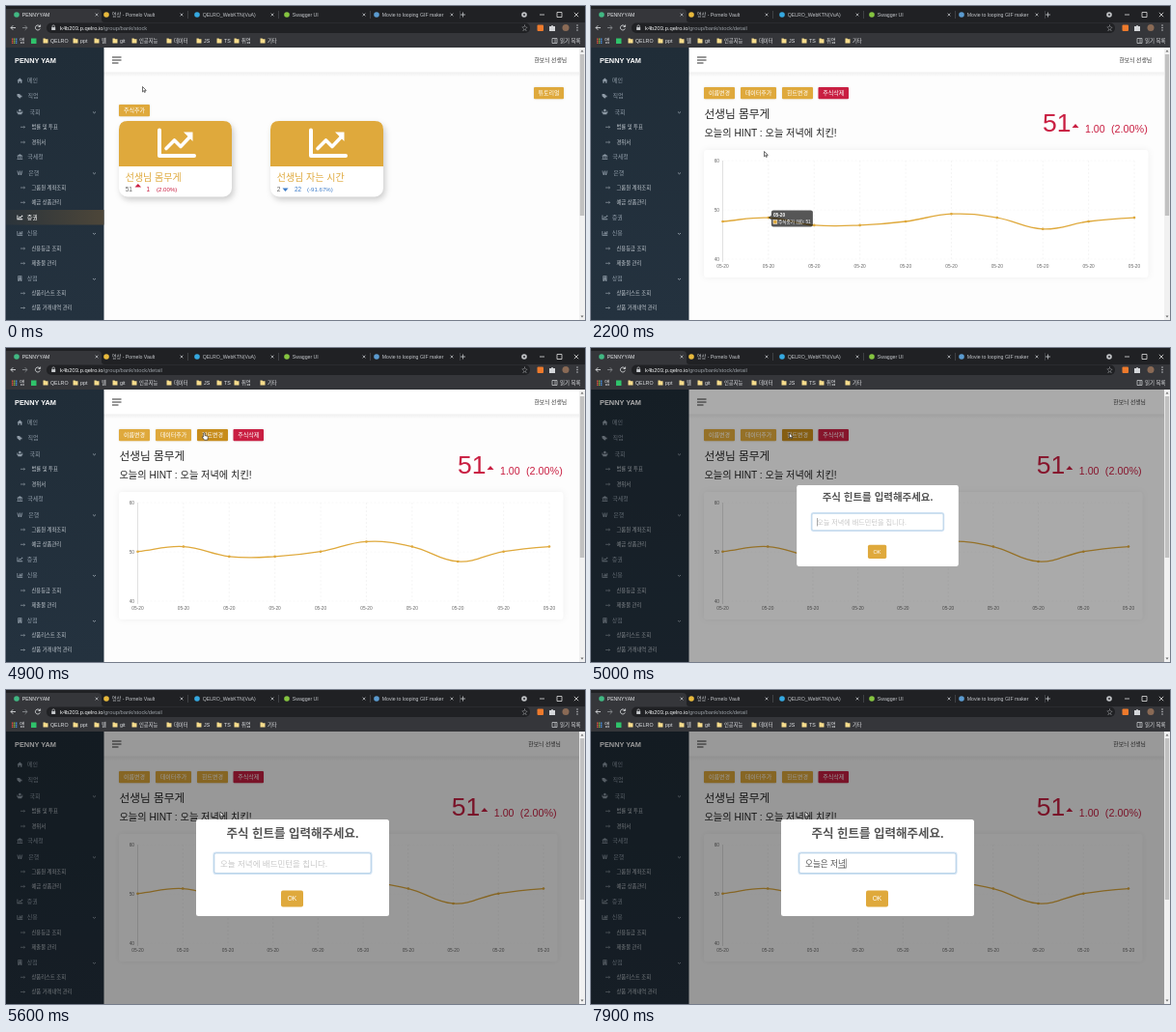
Recreate the animation shown at these times as an HTML page. Size 600 px wide and 325 px high, loop 8000 ms.

```html
<!DOCTYPE html>
<html lang="ko">
<head>
<meta charset="utf-8">
<style>
html, body { margin: 0; width: 100%; height: 100%; overflow: hidden; }
svg { display: block; font-family: "Liberation Sans", "Noto Sans CJK KR", sans-serif; }
text { white-space: pre; }
.card { filter: drop-shadow(2px 3px 3px rgba(0, 0, 0, .2)); }
.panel { filter: drop-shadow(0 0 3px rgba(0, 0, 0, .06)); }
.btn { filter: drop-shadow(0 .5px 1px rgba(0, 0, 0, .1)); }
</style>
</head>
<body>
<svg id="stage" width="600" height="325" viewBox="0 0 600 325"></svg>
<script>
const GOLD = '#dfa93c', GOLD_HOVER = '#c78c1b', RED = '#c91f42', BLUE = '#3d7cc9';
const LOOP = 8000, NAVIGATE = 1900, OPEN = 4970;

// Markup helpers; text is placed by its vertical centre.
const text = (x, cy, size, fill, str, more = '') =>
  `<text x="${x}" y="${cy + size * .36}" font-size="${size}" fill="${fill}" ${more}>${str}</text>`;
const rect = (x, y, w, h, fill, r = 0, more = '') =>
  `<rect x="${x}" y="${y}" width="${w}" height="${h}" rx="${r}" fill="${fill}" ${more}/>`;
const dot = (x, y, r, fill) => `<circle cx="${x}" cy="${y}" r="${r}" fill="${fill}"/>`;
const line = (d, stroke, w = 1, more = '', fill = 'none') =>
  `<path d="${d}" fill="${fill}" stroke="${stroke}" stroke-width="${w}" ${more}/>`;
const shape = (d, fill) => `<path d="${d}" fill="${fill}"/>`;
const MIDDLE = 'text-anchor="middle"', MEDIUM = 'font-weight="500"';
const button = (x, y, w, label, fill = GOLD, id = '') =>
  `<g class="btn">${rect(x, y, w, 12.2, fill, 1, id && `id="${id}"`)}` +
  text(x + w / 2, y + 6.1, 6, '#fff', label, MIDDLE) + '</g>';

function browser() {
  const cross = (x, y, s, c) => line(`M${x - s} ${y - s}l${2 * s} ${2 * s}m0 ${-2 * s}l${-2 * s} ${2 * s}`, c, .8);
  const tabs = [
    [8, 'PENNYYAM', '#41b883'], [101, '영상 - Pomelo Vault', '#e8b93c'], [195, 'QELRO_WebKTN(VuA)', '#35a8e0'],
    [288, 'Swagger UI', '#85c440'], [381, 'Movie to looping GIF maker', '#5b9bd0']];
  let s = rect(0, 0, 600, 43, '#35363a') + rect(0, 0, 600, 17, '#202124') +
    shape('M0 17V3H95Q99 3 99 7V14Q99 17 102 17Z', '#35363a');
  tabs.forEach(([x, name, color], i) => {
    s += dot(x + 3, 9, 2.8, color) + text(x + 8.7, 9, 5.2, i ? '#c3c6ca' : '#e8eaed', name) +
      cross([94, 182, 276, 371, 462][i], 9, 1.4, '#b5b8bc');
    if (i) s += rect([0, 185, 279, 374, 467][i] + 3, 5, .6, 8, '#55585c');
  });
  s += line('M471 9h5m-2.5 -2.5v5', '#c5c8cb', .8) + dot(537, 9, 2.8, '#c0c2c5') + dot(537, 9, 1.1, '#35363a') +
    line('M553 9h5M571 6.500h5v5h-5Z', '#e0e0e0', .8) + cross(591, 9, 2.2, '#e0e0e0');

  s += line('M10 22.500H5m2.300-2.300l-2.300 2.300l2.300 2.300', '#d5d7da', .9) +
    line('M17 22.500h5m-2.300-2.300l2.300 2.300l-2.300 2.300', '#85888c', .9) +
    line('M35 21a2.500 2.500 0 1 0 .3 2.300M35.600 19.500v2h-2', '#d5d7da', .9) +
    rect(42, 17.5, 501, 10.5, '#202124', 5) + rect(47.2, 22, 4, 3, '#c5c8cb') +
    line('M48 22v-1a1.200 1.200 0 0 1 2.400 0v1', '#c5c8cb', .7) +
    `<text x="56" y="24.700" font-size="5.800" fill="#9aa0a6"><tspan fill="#f1f3f4">k4b203.p.qelro.io</tspan>/group/bank/stock<tspan id="path"></tspan></text>` +
    text(537.5, 22.5, 6.5, '#d5d7da', '☆', MIDDLE) + rect(550.5, 19.5, 6.5, 6.5, '#ee7a2c', 1) +
    shape('M563 21h2a1 1 0 0 1 2 0h2v5h-6Z', '#d5d7da') + dot(580, 22.5, 3.5, '#8a6a55') +
    [20, 22.5, 25].map(y => dot(592, y, .7, '#d5d7da')).join('');

  for (let i = 0; i < 9; i++)
    s += rect(6 + i % 3 * 2, 33.5 + (i / 3 | 0) * 2, 1.4, 1.4, ['#e5533d', '#7fb84a', '#4a8ee0'][i % 3]);
  s += text(14, 36, 5.6, '#e0e2e5', '앱') + rect(26, 33.5, 5.5, 5.5, '#2fc36b');
  [[46, 'QELRO'], [77, 'ppt'], [99, '웹'], [118, 'git'], [138, '인공지능'], [174, '데이터'], [205, 'JS'],
    [226, 'TS'], [244, '취업'], [271, '기타']].forEach(([x, name]) => {
    s += shape(`M${x - 7.5} 33.500h2l.7 .7h2.300v4.300h-5Z`, '#f6dc8c') + text(x, 36, 5.3, '#e0e2e5', name);
  });
  return s + line('M566 33.500h5v5h-5ZM568 35h2M568 37h2', '#d5d7da', .7) + text(574, 36, 5.4, '#e0e2e5', '읽기 목록');
}

function sidebar() {
  const icons = {
    home: 'M0 3.500L3.500 .3L7 3.500H6V6.500H4.300V4.500H2.700V6.500H1V3.500Z',
    tags: 'M0 .8H3L6 3.800L3.300 6.500L0 3.500ZM4 .8L7 3.800L4.500 6.500L6.500 3.800Z',
    people: 'M2 1.500a1.500 1.500 0 0 1 3 0a1.500 1.500 0 0 1 -3 0M1 6.500V4.500Q1 3.500 2 3.500H5Q6 3.500 6 4.500V6.500ZM0 2h1v3h-1ZM6 2h1v3h-1Z',
    bank: 'M0 2L3.500 0L7 2V2.600H0ZM.8 3h1v2.400h-1ZM3 3h1v2.400h-1ZM5.200 3h1v2.400h-1ZM0 5.800h7v.9H0Z',
    won: 'M0 .8H1L2.200 5L3 .8H4L4.800 5L6 .8H7L5.500 6.300H4.200L3.500 3L2.800 6.300H1.500ZM0 2.500H7V3H0Z',
    stock: 'M0 .8H1V5.500H7V6.500H0ZM1.600 4.200L3.300 2.400L4.300 3.300L5.700 1.800L5.200 1.200H7V3L6.400 2.500L4.300 4.700L3.300 3.700L2.200 4.900Z',
    bars: 'M0 .8H.9V5.600H7V6.500H0ZM1.600 3.500h1V5h-1ZM3.100 1.500h1V5h-1ZM4.500 2.700h1V5h-1ZM5.900 1h1V5h-1Z',
    shop: 'M1 0H6V6.500H4V5H3V6.500H1ZM2 1V2H3V1ZM4 1V2H5V1ZM2 3V4H3V3ZM4 3V4H5V3Z'
  };
  // [centre y, label, icon (none for a sub item), label x, has chevron]
  const items = [
    [77, '메인', 'home', 22], [93, '직업', 'tags', 22.5], [109.5, '국회', 'people', 24.5, 1], [125.3, '법률 및 투표'], [141, '경위서'],
    [156, '국세청', 'bank', 22.3], [172.5, '은행', 'won', 23.3, 1], [188, '그룹원 계좌조회'], [203.3, '예금 상품관리'],
    [218.5, '증권', 'stock', 21.7], [235, '신용', 'bars', 21.7, 1], [251, '신용등급 조회'], [266.3, '제출물 관리'],
    [282, '상점', 'shop', 21.7, 1], [297.3, '상품리스트 조회'], [312.5, '상품 거래내역 관리']];
  let s = rect(0, 43, 101.5, 282, 'url(#side)') + rect(0, 211, 101.5, 15.5, 'url(#active)', 0, 'id="activeBar"') +
    text(9, 56, 7.4, '#fff', 'PENNY YAM', 'font-weight="bold"');
  for (const [y, label, icon, x, chevron] of items) {
    if (icon) {
      const id = icon === 'stock' ? 'id="activeItem"' : '';
      s += `<g fill="#8e9aa6" ${id}><path d="${icons[icon]}" transform="translate(11.500 ${y - 2.7}) scale(.82)" fill-rule="evenodd"/>` +
        text(x, y, 6, 'inherit', label).replace('fill="inherit"', '') + '</g>';
    } else {
      s += line(`M15 ${y}h4.500m-1.100 -1l1.100 1l-1.100 1`, '#a3adb6', .6) + text(26.5, y, 5.3, '#c3cad1', label);
    }
    if (chevron) s += line(`M90 ${y}l1.500 1.300l1.500 -1.300`, '#a3adb6', .8);
  }
  return s;
}

function stockCard(x, title, price, up, change, percent, positions) {
  const color = up ? RED : BLUE, [tri, cx, px] = positions;
  const arrow = up ? `M${x + tri} 187.500l3.300 -3.500l3.300 3.500Z` : `M${x + tri} 188.500h6l-3 3.400Z`;
  const round = 'stroke-linecap="round" stroke-linejoin="round"';
  return `<g class="card">${rect(x, 119, 117, 78.5, '#fff', 9)}</g>` +
    shape(`M${x} 166V128q0 -9 9 -9h99q9 0 9 9V166Z`, GOLD) +
    `<g transform="translate(${x} 119)">` +
    line('M42 9.500V36H78', '#fff', 4, round) + line('M49 28.500L57.500 20L64 26.500L73 17', '#fff', 3.6, round) +
    shape('M67 11.500H76.500V21Z', '#fff') + '</g>' +
    text(x + 6.7, 177, 10, GOLD, title) + text(x + 6.7, 189.5, 6.6, '#666', price) + shape(arrow, color) +
    text(x + cx, 189.5, 6.4, color, change) + text(x + px, 189.5, 6.1, color, percent);
}

const listPage = () => button(547, 84, 31, '튜토리얼') + button(117, 102, 32, '주식추가') +
  stockCard(117, '선생님 몸무게', '51', true, '1', '(2.00%)', [16.5, 28.5, 39]) +
  stockCard(274, '선생님 자는 시간', '2', false, '22', '(-91.67%)', [12.5, 25, 38]);

const detailPage = () => button(117, 84, 32, '이름변경') + button(155, 84, 37, '데이터추가', GOLD, 'addButton') +
  button(198, 84, 32, '힌트변경', GOLD, 'hintButton') + button(235.5, 84, 31.5, '주식삭제', RED) +
  text(117.5, 112, 11.7, '#222', '선생님 몸무게', MEDIUM) +
  text(117.5, 131, 10.2, '#222', '오늘의 HINT : 오늘 저녁에 치킨!', MEDIUM) +
  `<g id="price">${text(468, 120.3, 26.5, RED, '51')}${shape('M498.500 126l3.500 -4l3.500 4Z', RED)}` +
  text(512, 127, 10.6, RED, '1.00') + text(539, 127, 10.8, RED, '(2.00%)') + '</g><g id="chart"></g>';

const modal = () => rect(197, 134, 200, 100, '#fff', 2.5) +
  text(297, 148.5, 12.5, '#545454', '주식 힌트를 입력해주세요.', `${MIDDLE} font-weight="600"`) +
  rect(215, 168, 164, 22.5, 'none', 2.5, 'stroke="#d3e4f4" stroke-width="1.200"') +
  rect(215.8, 168.8, 162.4, 20.9, '#fff', 2, 'stroke="#9cc0e0" stroke-width=".8"') +
  text(222, 179.5, 8.5, '#c8c8c8', '오늘 저녁에 배드민턴을 칩니다.', 'id="placeholder"') +
  text(222, 179.5, 8.6, '#545454', '', 'id="typed"') + rect(222, 174.5, .6, 10, '#555', 0, 'id="caret"') +
  rect(285, 207.5, 23, 17, GOLD, 2) + text(296.5, 216, 6.6, '#fff', 'OK', MIDDLE);

const ARROW = 'M0 0V8.300L2 6.500L3.200 9.200L4.400 8.700L3.200 6H5.800Z';
const HAND = 'M-1 5V0q.9 -1.200 1.800 0V3.200l3.200 .8q1 .3 .8 1.500L4.200 9H0L-2.800 5.200q.6 -1 1.800 -.2Z';

const stage = document.getElementById('stage');
stage.innerHTML = `<defs>
  <linearGradient id="side" x2="0" y2="1"><stop stop-color="#202d38"/><stop offset="1" stop-color="#24323f"/></linearGradient>
  <linearGradient id="active"><stop stop-color="#2b343b"/><stop offset="1" stop-color="#4d4639"/></linearGradient>
  <linearGradient id="shade" x2="0" y2="1"><stop stop-color="#efefef"/><stop offset="1" stop-color="#fdfdfd"/></linearGradient></defs>` +
  rect(0, 0, 600, 325, '#fdfdfd') + rect(101, 43, 499, 25.5, '#fff') + rect(101, 68.5, 499, 5, 'url(#shade)') +
  line('M110 53h9.500M110 56h9.500M110 59h6.500', '#333', 1.1) +
  text(547.5, 56, 5.8, '#333', '한보늬 선생님', 'id="user"') +
  `<g id="list">${listPage()}</g><g id="detail">${detailPage()}</g>` + sidebar() + browser() +
  rect(0, 43, 594, 282, '#000', 0, 'id="backdrop"') + `<g id="modal">${modal()}</g>` +
  rect(594, 43, 6, 282, '#f1f1f1') + rect(594.8, 50, 4.4, 167, '#c1c1c1') +
  shape('M595.500 47.500l1.500 -2l1.500 2ZM595.500 320.500l1.500 2l1.500 -2Z', '#666') +
  `<g id="arrow">${line(ARROW, '#222', 1, '', '#fff')}</g><g id="hand">${line(HAND, '#222', .8, '', '#fff')}</g>`;

const $ = Object.fromEntries([...stage.querySelectorAll('[id]')].map(el => [el.id, el]));
const show = (el, on) => el.setAttribute('display', on ? 'inline' : 'none');
const clamp = u => Math.max(0, Math.min(1, u));

const PRICES = [50, 51, 49, 49, 50, 52, 51, 48, 50, 51];

function chart(grow, right, tooltip) {
  const left = 136.5, base = 262, step = (right - left) / 9;
  const pts = PRICES.map((v, i) => [left + i * step, base - (v - 40) * 5.13 * grow]);
  let s = rect(117, 149, right - 102.5, 132, '#fff', 3, 'class="panel"');
  [60, 50, 40].forEach((v, i) => {
    const y = 160 + i * 51;
    s += line(`M${left - 3} ${y}H${right}`, '#f2f2f2', .5, 'stroke-dasharray="2 2"') +
      text(133, y, 4.8, '#666', v, 'text-anchor="end"');
  });
  pts.forEach(([x], i) => {
    s += line(`M${x} 160V265`, i ? '#eee' : '#ccc', .6, i ? 'stroke-dasharray="2 2"' : '') +
      text(x, 269, 4.8, '#666', '05-20', MIDDLE);
  });
  // Cubic spline with tension 0.4
  const control = (i, dir) => {
    const a = pts[Math.max(0, i - 1)], b = pts[Math.min(9, i + 1)], k = dir * (i % 9 ? .2 : .4);
    return [pts[i][0] + k * (b[0] - a[0]), pts[i][1] + k * (b[1] - a[1])];
  };
  let d = `M${pts[0]}`;
  for (let i = 1; i < 10; i++) d += `C${control(i - 1, 1)} ${i === 9 ? pts[9] : control(i, -1)} ${pts[i]}`;
  s += line(d, GOLD, 1.3) + pts.map(([x, y]) => dot(x, y, 1.3, GOLD)).join('');
  if (tooltip) {
    const [x, y] = pts[1];
    s += `<g opacity=".66">${rect(x + 3, y - 7.5, 43, 17, '#000', 2)}${shape(`M${x} ${y}l3 -2.500v5Z`, '#000')}</g>` +
      text(x + 5, y - 2.7, 4.8, '#fff', '05-20', 'font-weight="bold"') +
      rect(x + 5, y + 2.4, 4, 4, GOLD, 0, 'stroke="#fff" stroke-width=".5"') +
      text(x + 10, y + 4.4, 4.7, '#fff', '주식종가 (원): 51');
  }
  return s;
}

// Pointer stops: [time, x, y]
const ROUTE = [[0, 141.5, 83.5], [300, 141.5, 83.5], [1200, 179.5, 150.5], [2200, 179.5, 150.5], [2700, 176.5, 92.5],
  [4500, 176.5, 92.5], [4700, 205.5, 88], [5000, 205.5, 88], [5500, 222, 126], [LOOP, 222, 126]];

function pointer(t) {
  const i = ROUTE.findIndex(stop => stop[0] > t), [t0, x0, y0] = ROUTE[i - 1], [t1, x1, y1] = ROUTE[i];
  const u = (t - t0) / (t1 - t0), k = u * u * (3 - 2 * u);
  return [x0 + (x1 - x0) * k, y0 + (y1 - y0) * k];
}

// Composition states of the Korean input method
const KEYS = ['', 'ㅇ', '오', '온', '오느', '오늘', '오늘ㅇ', '오늘으', '오늘은', '오늘은 ',
  '오늘은 ㅈ', '오늘은 저', '오늘은 전', '오늘은 저녀', '오늘은 저녁'];

function popScale(ms) {
  const steps = [[0, .7], [135, 1.05], [240, .95], [300, 1]];
  const i = steps.findIndex(step => step[0] > ms);
  if (i < 1) return 1;
  const [[a, from], [b, to]] = [steps[i - 1], steps[i]];
  return from + (to - from) * (1 - (1 - (ms - a) / (b - a)) ** 2);
}

function draw(t) {
  const detail = t >= NAVIGATE, open = t >= OPEN, [x, y] = pointer(t);
  const shift = `translate(${open ? -6.2 : 0} 0)`;
  show($.list, !detail);
  show($.detail, detail);
  show($.activeBar, !detail);
  $.activeItem.setAttribute('fill', detail ? '#8e9aa6' : '#fff');
  $.path.textContent = detail ? '/detail' : '';
  $.user.setAttribute('transform', shift);
  $.price.setAttribute('transform', shift);
  if (detail) {
    const grow = 1 - (1 - clamp((t - NAVIGATE) / 1000)) ** 4;
    $.chart.innerHTML = chart(grow, open ? 557 : 563, t >= 2000 && t < 2400);
  }

  const over = (left, right) => detail && y > 84 && y < 97 && x > left && x < right;
  const onAdd = over(155, 192), onHint = over(198, 230);
  $.addButton.setAttribute('fill', onAdd ? GOLD_HOVER : GOLD);
  $.hintButton.setAttribute('fill', onHint ? GOLD_HOVER : GOLD);
  const hand = !open && (onAdd || onHint || (!detail && y > 119));
  show($.hand, hand);
  show($.arrow, !hand);
  $.hand.setAttribute('transform', `translate(${x} ${y}) scale(.8)`);
  $.arrow.setAttribute('transform', `translate(${x} ${y}) scale(.65)`);

  show($.backdrop, open);
  show($.modal, open);
  if (!open) return;
  $.backdrop.setAttribute('opacity', .4 * clamp((t - OPEN) / 36));
  $.modal.setAttribute('transform', `translate(297 184) scale(${popScale(t - OPEN)}) translate(-297 -184)`);
  const n = t < 7600 ? Math.max(0, Math.min(9, Math.floor((t - 6000) / 160))) : 10 + Math.floor((t - 7600) / 75);
  const value = KEYS[n], composing = n > 0 && n !== 9;
  show($.placeholder, !n);
  $.typed.innerHTML = composing ? `${value.slice(0, -1)}<tspan text-decoration="underline">${value.slice(-1)}</tspan>` : value;
  $.caret.setAttribute('x', 222 + (n ? $.typed.getComputedTextLength() : 0));
  show($.caret, n > 0 || (t - OPEN) % 1000 < 500);
}

function tick() {
  draw(Math.floor(performance.now() % LOOP / 100) * 100);
  requestAnimationFrame(tick);
}
tick();
</script>
</body>
</html>
```
